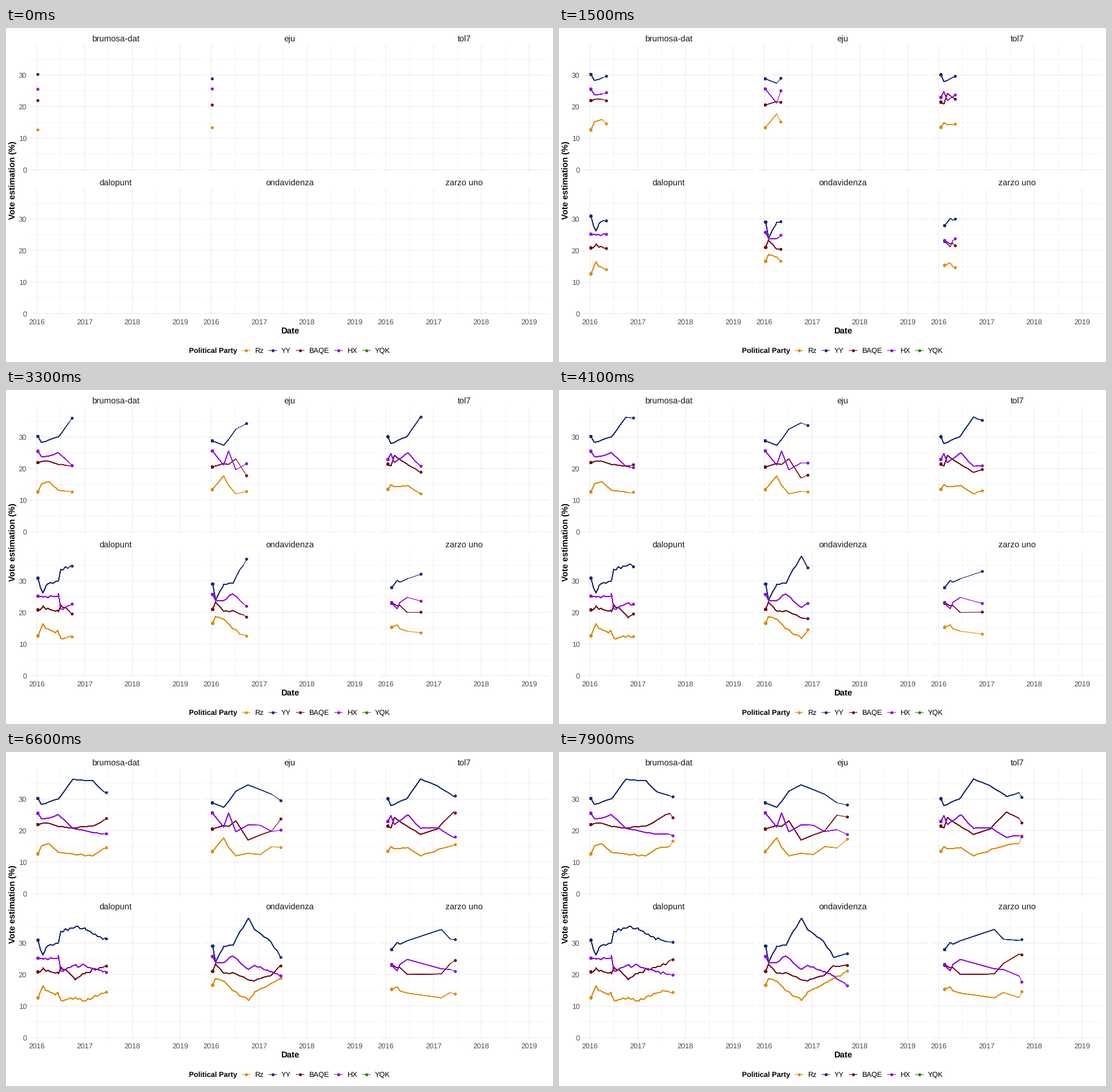
Animation of 900x550 px, one loop 8000 ms. Source, as a matplotlib script:

```python
import numpy as np
import matplotlib.pyplot as plt
from matplotlib.animation import FuncAnimation
from matplotlib.collections import LineCollection

W, H, DPI = 900, 550, 100
PX = 72 / DPI
FRAMES, STEP = 80, 100
DAY_START, DAYS_PER_FRAME = 8, 7.94
REPAINT, DEPTH = 3, 5
PITCH_X, PITCH_Y = 287, 237

plt.rcParams.update({"font.family": "Liberation Sans", "text.hinting": "none"})
PARTIES = {"Rz": "#E08A00", "YY": "#192B78", "BAQE": "#750C14", "HX": "#8A00F0", "YQK": "#2F7D08"}
COLORS = list(PARTIES.values())
GRID = "#EBEBEB"
rng = np.random.default_rng(4)


def px_x(day, col):
    return 50.7 + PITCH_X * col + np.asarray(day) * 0.2155


def px_y(pct, row):
    return 233.2 + PITCH_Y * row - np.asarray(pct) * 5.19


panels = []


def panel(name, turns, *levels, gap=0, ripple=0):
    """Turning points in days since 2016; polls every `gap` days ripple between them."""
    between = np.arange(turns[0] + gap, turns[-1], gap) if gap else []
    days = np.union1d(turns, between)
    loose = ~np.isin(days, turns)
    polls = [np.interp(days, turns, v) + ripple * loose * rng.normal(size=days.size) for v in levels]
    panels.append((name, days, polls))


panel("brumosa-dat", [8, 35, 93, 165, 276, 425, 510, 610, 636],
      [12.6, 15, 15.9, 13.1, 12.5, 12, 14.3, 15, 16.7],
      [30.2, 28.3, 29.1, 30, 36.3, 35.8, 32.4, 31, 30.7],
      [21.9, 22.2, 22.3, 21.3, 20.9, 21.4, 23.3, 25.5, 24],
      [25.5, 23.8, 24, 25, 20.7, 19.4, 19, 18.8, 18.3], gap=30, ripple=0.1)

panel("eju", [8, 95, 132, 188, 281, 374, 462, 555, 636],
      [13.3, 17.7, 14.7, 12, 12.8, 12.4, 14.9, 14.5, 17.3],
      [28.8, 27.4, 29.2, 32.5, 34.5, 33, 31.5, 28.8, 28.1],
      [20.5, 21.6, 21.3, 23.1, 17, 18.6, 19.9, 24.9, 24.3],
      [25.6, 21.1, 25.6, 19.6, 21.8, 21.7, 19.7, 20.3, 18.7])

panel("tol7", [17, 40, 67, 171, 266, 396, 518, 614, 637],
      [13.4, 14.9, 14.2, 14.6, 11.9, 13.9, 15.4, 15.9, 18.6],
      [30.1, 27.9, 28.3, 30.6, 36.4, 34.2, 30.8, 32, 30.4],
      [21.4, 20.8, 24.2, 21.2, 18.8, 20.5, 25.9, 23.9, 22.3],
      [22.9, 24.8, 21.9, 25, 20.7, 20.9, 17.8, 18.4, 18], gap=35, ripple=0.1)

panel("dalopunt", [9, 46, 70, 165, 183, 299, 373, 499, 636],
      [12.6, 16.3, 14.9, 13.5, 11.8, 12.6, 11.5, 14.1, 14.3],
      [30.9, 26.3, 28.6, 30, 33.7, 35.3, 34.3, 31.4, 30.2],
      [20.8, 21.8, 21, 20.2, 22.4, 18.7, 20.6, 22.2, 24.7],
      [25.2, 25.1, 25, 26, 21.2, 23.1, 22.7, 21.1, 19.8], gap=19, ripple=0.3)

panel("ondavidenza", [11, 33, 95, 165, 285, 332, 457, 525, 636],
      [16.6, 18.8, 18, 14.8, 11.7, 14.5, 17.2, 18.7, 21.2],
      [29, 24.1, 29, 29.4, 37.9, 34.2, 30.2, 25.8, 26.4],
      [21, 23.4, 20.4, 20.6, 18.3, 18, 19.7, 22.7, 22.5],
      [25.7, 23.8, 23.8, 25.9, 21.6, 22.9, 21, 19.5, 16.5], gap=26, ripple=0.2)

panel("zarzo uno", [46, 88, 109, 165, 425, 494, 615, 637],
      [15.3, 16.1, 14.8, 14.1, 12.6, 14.3, 12.7, 14.7],
      [27.9, 30.2, 29.6, 30.7, 34.3, 31.2, 30.8, 31.1],
      [23.1, 22.1, 22.2, 20, 20.2, 23.5, 26.5, 26.2],
      [22.9, 21.2, 23.2, 24.8, 21.8, 21.6, 19.5, 17.4])

fig = plt.figure(figsize=(W / DPI, H / DPI), dpi=DPI, facecolor="white")
ax = fig.add_axes([0, 0, 1, 1])
ax.set(xlim=(0, W), ylim=(H, 0))
ax.axis("off")


def label(x, y, s, size=12, color="black", **kw):
    ax.text(x, y, s, fontsize=size * PX, color=color, va="baseline", **kw)


def rule(xs, ys, color=GRID, width=1.07):
    ax.plot(xs, ys, color=color, lw=width * PX, snap=False, solid_capstyle="butt", zorder=1)


def draw_panel(i, name):
    row, col = divmod(i, 3)
    left, top = 39.4 + PITCH_X * col, 27.3 + PITCH_Y * row
    right, bottom = left + 281.3, top + 209.8
    for k in range(7):
        x = px_x(365.25 * k / 2, col)
        rule([x, x], [top, bottom], width=0.53 if k % 2 else 1.07)
        if row == 1 and k % 2 == 0:
            label(x, 488.3, str(2016 + k // 2), color="#4D4D4D", ha="center")
    for v in range(0, 40, 5):
        y = px_y(v, row)
        rule([left, right], [y, y], width=0.53 if v % 10 else 1.07)
        if col == 0 and v % 10 == 0:
            label(34.2, y + 4.3, str(v), color="#4D4D4D", ha="right")
    label((left + right) / 2, 22 + PITCH_Y * row, name, 14, "#1A1A1A", ha="center")


for i, (name, _, _) in enumerate(panels):
    draw_panel(i, name)

label(466.8, 503, "Date", 14, weight="bold", ha="center")
label(15.5, 251, "Vote estimation (%)", 14, weight="bold", ha="center",
      rotation=90, rotation_mode="anchor")
label(301, 535.2, "Political Party", weight="bold")

DOT = (4.9 * PX) ** 2
for x, (party, color) in zip([395, 439, 484, 547, 593], PARTIES.items()):
    rule([x - 7, x + 7], [531, 531], color)
    ax.scatter([x], [531], s=DOT, c=color, linewidths=0, zorder=3)
    label(x + 14, 535.2, party)

lines = LineCollection([], linewidths=1.07 * PX, capstyle="butt", joinstyle="round", zorder=4)
ax.add_collection(lines, autolim=False)
dots = ax.scatter([], [], s=DOT, linewidths=0, zorder=5)


def draw(frame):
    today = DAY_START + DAYS_PER_FRAME * frame
    paths, path_colors, spots, spot_colors = [], [], [], []
    for i, (_, days, polls) in enumerate(panels):
        seen = int(np.searchsorted(days, today, side="right"))
        if not seen:
            continue
        row, col = divmod(i, 3)
        # older stretches and first dots are painted again, so they look heavier
        ends = np.repeat(np.arange(max(2, seen - DEPTH), seen + 1), REPAINT)
        repeats = min(seen - 1, DEPTH) * REPAINT
        for poll, color in zip(polls, COLORS):
            x = px_x(np.append(days[:seen], today), col)
            y = px_y(np.append(poll[:seen], np.interp(today, days, poll)), row)
            trail = np.column_stack([x, y])
            paths += [trail] + [trail[:end] for end in ends if end <= seen]
            path_colors += [color] * (len(paths) - len(path_colors))
            spots += [trail[0]] * repeats + [trail[-1]]
            spot_colors += [color] * (repeats + 1)
    lines.set_segments(paths)
    lines.set_color(path_colors)
    dots.set_offsets(np.array(spots))
    dots.set_facecolor(spot_colors)
    return lines, dots


anim = FuncAnimation(fig, draw, frames=FRAMES, init_func=lambda: draw(0),
                     interval=STEP, repeat=True, repeat_delay=0)
plt.show()
```
